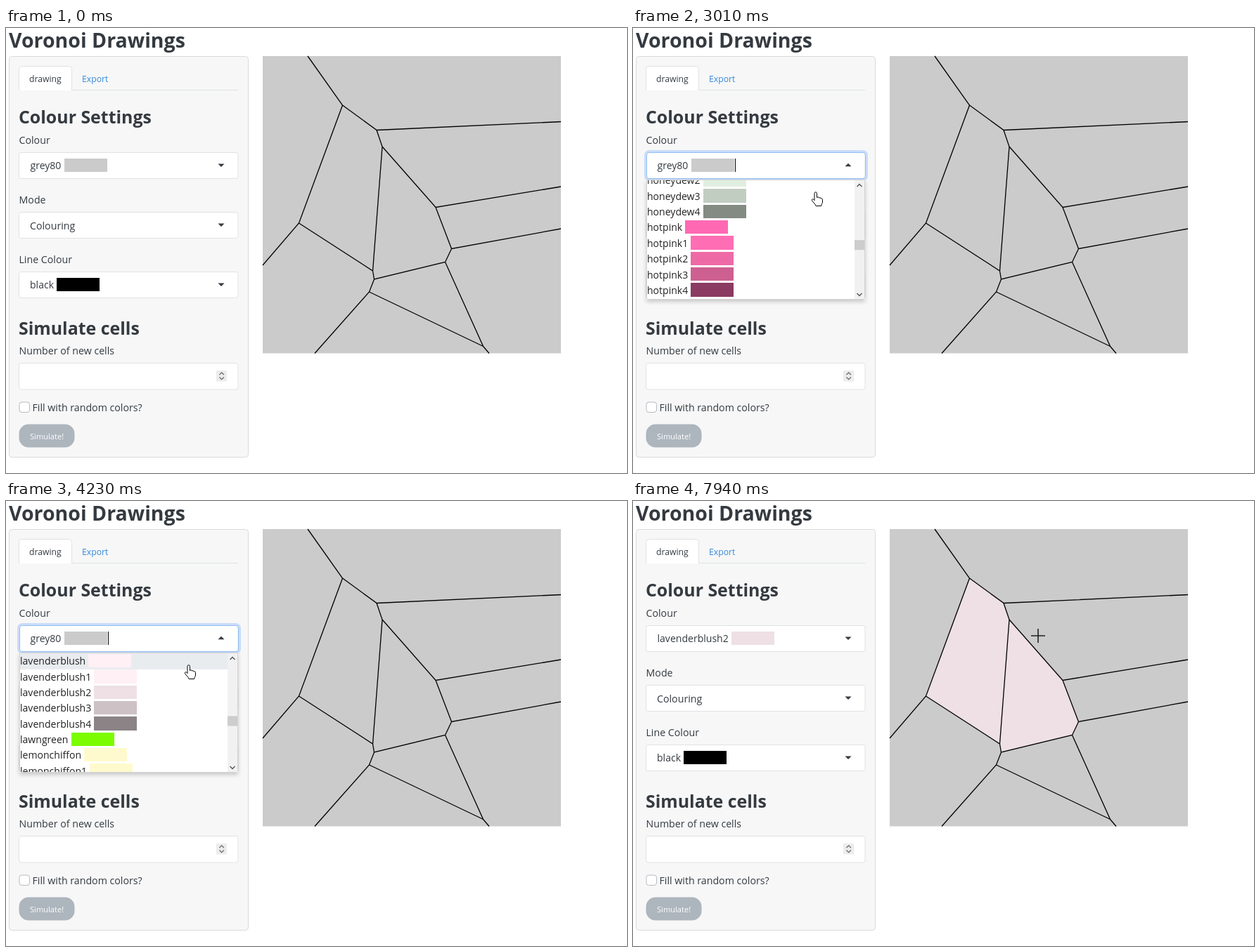
Animation, 883 px wide and 634 px high, one loop 8 s. Source, as an HTML page:

```html
<!DOCTYPE html>
<html lang="en">
<head>
<meta charset="utf-8">
<title>Voronoi Drawings</title>
<style>
html, body { margin: 0; width: 100%; height: 100%; overflow: hidden; background: #fff; }
body, text { font-family: "Open Sans", "Noto Sans", sans-serif; font-size: 14.2px; color: #343a40; fill: #343a40; }
svg, div { position: absolute; box-sizing: border-box; }
svg { left: 0; top: 0; }
.title { font-size: 28.5px; font-weight: 700; }
.head { font-size: 24.9px; font-weight: 700; }
.tab { font-size: 12.2px; }
.box { fill: #fff; stroke: #dee2e6; }
.row { font-size: 14.05px; line-height: 22.35px; white-space: pre; word-spacing: .5px; }
.row i { display: inline-block; width: 61px; height: 19.4px; margin-top: .6px; vertical-align: top; }
#ring { left: 18.5px; top: 177px; width: 312px; height: 37.5px; border: 1px solid #93bff1; border-radius: 4px; box-shadow: 0 0 0 3px #c9dcfa; }
#caret { left: 145px; top: 186px; width: 1px; height: 19px; background: #000; }
#list, #shadow { left: 19px; top: 216px; width: 311px; height: 171px; }
#list { overflow: hidden; background: #fff; border: 1px solid #d4d4d4; border-radius: 0 0 3px 3px; color: #222; }
#shadow { box-shadow: 0 3px 6px rgba(0,0,0,.2); }
#list .row { position: static; width: 295px; }
</style>
</head>
<body>
<svg width="883" height="634">
  <text class="title" x="4" y="28">Voronoi Drawings</text>
  <rect x="4.5" y="40.5" width="340" height="571" rx="4" fill="#f7f7f7" stroke="#dadada"/>
  <path d="M19 88.5H330" stroke="#dee2e6"/>
  <path class="box" d="M18.5 89V58.5a4 4 0 0 1 4-4H89.5a4 4 0 0 1 4 4V89"/>
  <text class="tab" x="33" y="77">drawing</text>
  <text class="tab" x="108" y="77" style="fill:#3489dc">Export</text>
  <text class="head" x="18" y="135.5">Colour Settings</text>
  <text x="18.5" y="165">Colour</text>
  <text x="18.5" y="250">Mode</text>
  <text x="18.5" y="335">Line Colour</text>
  <g class="box">
    <rect x="18.5" y="177.5" width="311.5" height="37" rx="3"/>
    <rect x="18.5" y="262.5" width="311.5" height="37" rx="3"/>
    <rect x="18.5" y="347.5" width="311.5" height="37" rx="3"/>
    <rect x="18.5" y="477.5" width="311.5" height="37.5" rx="3"/>
    <rect x="19" y="533" width="14.5" height="14.5" rx="3.5" stroke="#b4bac0"/>
  </g>
  <text x="34" y="287">Colouring</text>
  <path d="M301.5 278.5h9l-4.5 4.5zM301.5 363.5h9l-4.5 4.5z" fill="#343a40"/>
  <text class="head" x="18" y="436.5">Simulate cells</text>
  <text x="18.5" y="465">Number of new cells</text>
  <rect x="299" y="488" width="15" height="15.5" fill="#ececec"/>
  <path d="M303.5 494l3.2-3.2 3.2 3.2M303.5 497.5l3.2 3.2 3.2-3.2" fill="none" stroke="#666" stroke-width="1.2"/>
  <text x="37.5" y="545.5">Fill with random colors?</text>
  <rect x="18.5" y="564.5" width="79" height="33" rx="13.5" fill="#adb5bd"/>
  <text x="34" y="585.5" style="font-size:11.1px;fill:#fff">Simulate!</text>

  <rect x="365" y="40" width="424" height="423.5" fill="#cbcbcb"/>
  <g fill="#eee0e5">
    <path id="rightCell" d="M535 169L611 255.5 633.5 314.5 624.5 333.5 523.5 358 521.5 346z"/>
    <path id="leftCell" d="M478.5 110L527 145.5 535 169 521.5 346 416.5 278z"/>
  </g>
  <path fill="none" stroke="#000" stroke-width="1.3" d="M429 40L478.5 110 416.5 278 365 338M416.5 278L521.5 346 535 169 527 145.5 478.5 110M527 145.5L789 133.5M535 169L611 255.5 789 226M611 255.5L633.5 314.5 789 286M633.5 314.5L624.5 333.5 523.5 358 521.5 346M523.5 358L516.5 376 439 463.5M516.5 376L678.5 453.5 624.5 333.5M678.5 453.5L687 463.5"/>
</svg>

<div id="ring"></div>
<div class="row" id="value" style="left:34.5px;top:185px"></div>
<div class="row" style="left:34px;top:355px">black <i style="background:#000"></i></div>
<div id="caret"></div>
<svg width="883" height="634"><path id="toggle" fill="#343a40"/></svg>

<div id="shadow"></div>
<div id="list">
  <div id="rows"></div>
  <svg style="left:295px" width="15" height="170">
    <rect width="15" height="170" fill="#f1f1f1"/>
    <rect id="thumb" width="15" height="14" fill="#cdcdcd"/>
    <path d="M3.5 9l3.5-3.5 3.5 3.5M3.5 161l3.5 3.5 3.5-3.5" fill="none" stroke="#555" stroke-width="1.4"/>
  </svg>
</div>
<svg width="883" height="634"><path id="cursor" stroke-linejoin="round"/></svg>

<script>
const $ = id => document.getElementById(id);
const ROW = 22.35, LIST_TOP = 219.8, LOOP = 8000;
const OPEN = 1590, CLOSE = 5610;

// Base colour followed by its numbered shades
const families = `grey100 ffffff
honeydew f0fff0 f0fff0 e0eee0 c1cdc1 838b83
hotpink ff69b4 ff6eb4 ee6aa7 cd6090 8b3a62
indianred cd5c5c ff6a6a ee6363 cd5555 8b3a3a
ivory fffff0 fffff0 eeeee0 cdcdc1 8b8b83
khaki f0e68c fff68f eee685 cdc673 8b864e
lavender e6e6fa
lavenderblush fff0f5 fff0f5 eee0e5 cdc1c5 8b8386
lawngreen 7cfc00
lemonchiffon fffacd fffacd eee9bf cdc9a5 8b8970`;
const label = (name, hex) => `${name} <i style="background:#${hex}"></i>`;
$('rows').innerHTML = families.split('\n').flatMap(line => {
  const [name, ...shades] = line.split(' ');
  return shades.map((hex, i) => `<div class="row">${label(name + (i || ''), hex)}</div>`);
}).join('');
const rows = [...$('rows').children];

const cursors = {
  arrow: 'M0 0V16l3.7-3.4 2.4 5.6 2.4-1-2.4-5.6H11z',
  hand: 'M-2 1.5a1.7 1.7 0 0 1 3.4 0V7.5c1-1 3-.8 3 .6 1-.8 2.8-.4 2.8 1 1.2-.6 2.3.1 2.3 1.3v3.6c0 2-1.8 3-1.8 5.5H0c-.5-2.5-3.5-4.5-5.5-7.8-.8-1.5 1-2.7 2.2-1.5l1.3 1.4z',
  beam: 'M-3-7H3M0-7V7M-3 7H3',
  cross: 'M-10 0H10M0-10V10'
};

// [time, x, y]
const path = [
  [460, 788, 634], [1130, 252, 226], [1260, 291, 192], [1450, 292, 193], [1590, 293, 187],
  [2340, 293, 187], [2900, 260, 234], [5160, 260, 234], [5340, 171, 271], [5620, 171, 271],
  [6280, 558, 263], [6420, 558, 263], [6540, 565, 266], [6760, 565, 266], [7070, 528, 260],
  [7530, 475, 235], [7660, 475, 235], [7940, 576, 192]
];
// [time, offset]
const scrolling = [[2900, 0], [3010, 80.4], [3080, 101], [3140, 101], [3760, 478], [3900, 545], [3960, 545], [4090, 606]];

const linear = u => u;
const smooth = u => u * u * (3 - 2 * u);
const clamp = u => Math.max(0, Math.min(1, u));
function at(keys, t, ease) {
  let i = 0;
  while (i < keys.length - 2 && t >= keys[i + 1][0]) i++;
  const [a, b] = [keys[i], keys[i + 1]];
  const u = ease(clamp((t - a[0]) / (b[0] - a[0])));
  return a.slice(1).map((v, k) => v + (b[k + 1] - v) * u);
}
const inside = (x, y, l, t, r, b) => x >= l && x <= r && y >= t && y <= b;
const show = (id, on) => $(id).style.visibility = on ? 'visible' : 'hidden';

function cursorKind(x, y, open) {
  if (inside(x, y, 365, 40, 789, 463)) return 'cross';
  if (inside(x, y, 19, 177, 330, 215)) return open ? 'beam' : 'hand';
  const overControl = open ? inside(x, y, 19, 216, 315, 387) : inside(x, y, 19, 262, 330, 300);
  return overControl ? 'hand' : 'arrow';
}

let shown;
function draw(t) {
  const open = t >= OPEN && t < CLOSE;
  const [x, y] = at(path, t, smooth), [offset] = at(scrolling, t, linear);

  const value = t < CLOSE ? label('grey80', 'cbcbcb') : label('lavenderblush2', 'eee0e5');
  if (value !== shown) $('value').innerHTML = shown = value;
  $('ring').style.opacity = clamp((t - 1690) / 150) * clamp(1 - (t - CLOSE) / 150);
  show('caret', open && (t - 1607 + 1066) % 1066 < 533);
  $('toggle').setAttribute('d', open ? 'M301.5 197.2h9l-4.5-4.5z' : 'M301.5 193.5h9l-4.5 4.5z');

  show('list', open);
  show('shadow', open);
  $('rows').style.top = LIST_TOP + .3 - 217 - offset + 'px';
  $('thumb').setAttribute('y', 84.5 + offset * .0082);
  const hovering = open && y > 216 && (t < 2940 || t >= 4230);
  const hovered = hovering ? Math.max(0, Math.floor((y - LIST_TOP + offset) / ROW)) : -1;
  rows.forEach((row, i) => row.style.background = i === hovered ? '#e9ecef' : 'none');

  show('rightCell', t >= 6810);
  show('leftCell', t >= 7660);

  const kind = cursorKind(x, y, open), lines = kind === 'cross' || kind === 'beam';
  const cursor = $('cursor');
  show('cursor', t >= 460);
  cursor.setAttribute('d', cursors[kind]);
  cursor.setAttribute('transform', `translate(${x} ${y})`);
  cursor.setAttribute('fill', lines ? 'none' : '#fff');
  cursor.setAttribute('stroke', lines ? '#222' : '#000');
  cursor.setAttribute('stroke-width', kind === 'cross' ? 1.6 : 1);
}

function tick() {
  draw(performance.now() % LOOP);
  requestAnimationFrame(tick);
}
tick();
</script>
</body>
</html>
```
